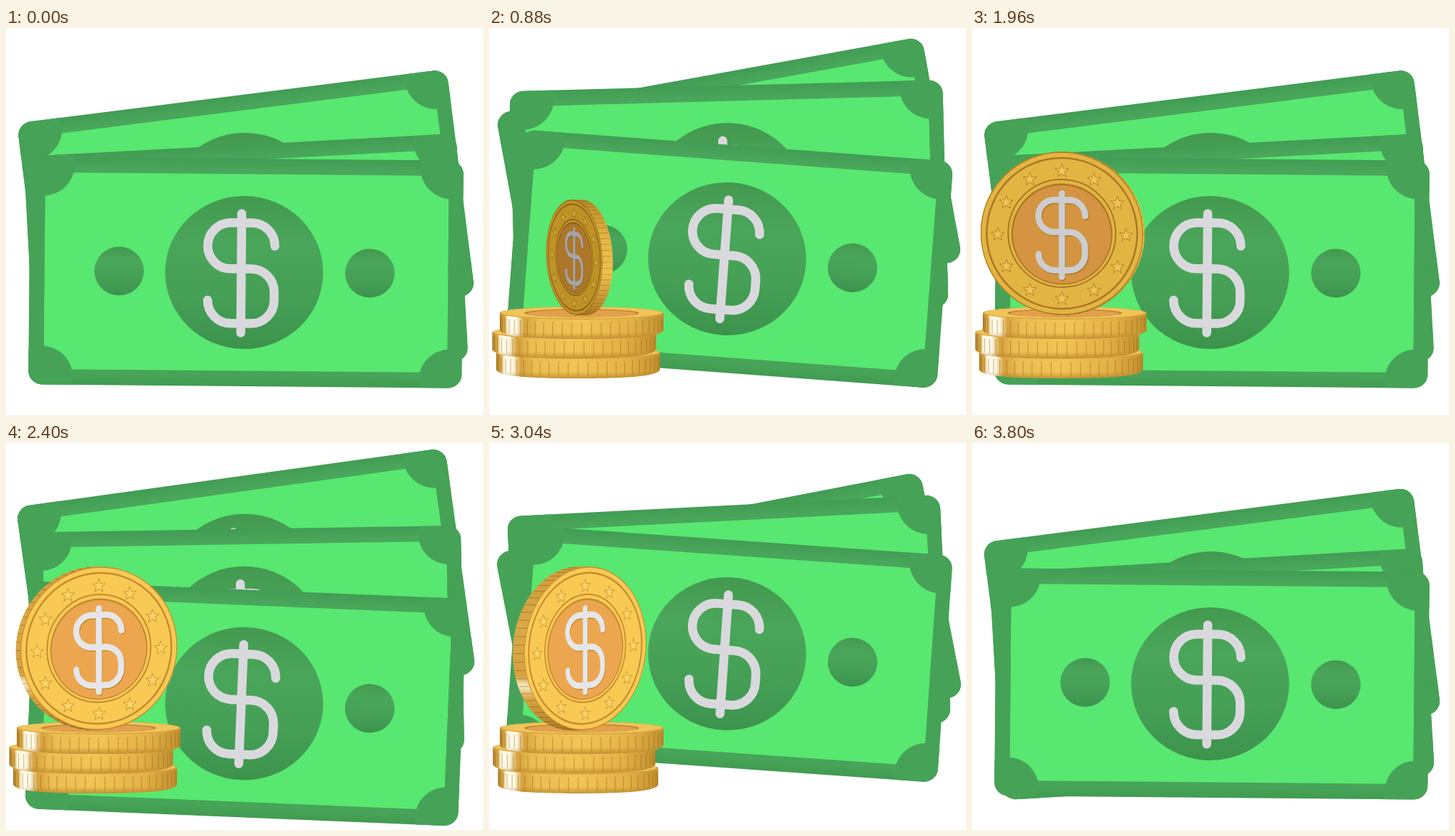
These frames come from a looping animation (664 px wide and 539 px high, 3.84 s). An HTML page with a canvas:

```html
<!DOCTYPE html>
<html lang="en">
<head>
<meta charset="utf-8">
<title>Cash and coins</title>
<style>
html, body { margin: 0; width: 100%; height: 100%; overflow: hidden; background: #fff; }
canvas { display: block; }
</style>
</head>
<body>
<canvas id="stage" width="664" height="539"></canvas>
<script>
const ctx = document.getElementById('stage').getContext('2d');
const LOOP = 3840, SWAY = 1920, STEP = 40, TAU = Math.PI * 2;

const clamp = x => Math.max(0, Math.min(1, x));
const mix = (a, b, k) => a + (b - a) * k;
const blend = (a, b, k) => `rgb(${a.map((v, i) => Math.round(mix(v, b[i], k)))})`;
const easeOut = x => 1 - (1 - clamp(x)) ** 3;
const easeIn = x => clamp(x) ** 2;

// Each wave is [mean, cosine part, sine part]; back to front.
const bills = [
  { y: [243, 9, -39.3], tilt: [-8.95, 1.75, 0.9] },
  { y: [279.5, 41.5, -6], tilt: [-2.55, -0.5, 1.7] },
  { y: [324, 16, 37], tilt: [2.4, -1.9, 0.15] }
];
const wave = ([mean, a, b], phase) => mean + a * Math.cos(phase) + b * Math.sin(phase);

// Bottom to top.
const stack = [
  { x: 124, base: 488 },
  { x: 118.5, base: 460 },
  { x: 129, base: 433 }
];

const spin = [[720, 70], [1320, 35], [1960, 4], [2400, -16], [3040, -41.5], [3440, -60]];

function track(points, t) {
  let i = 1;
  while (i < points.length - 1 && t > points[i][0]) i++;
  const [t0, a] = points[i - 1], [t1, b] = points[i];
  return mix(a, b, clamp((t - t0) / (t1 - t0)));
}

function gradient(x0, y0, x1, y1, ...stops) {
  const g = ctx.createLinearGradient(x0, y0, x1, y1);
  stops.forEach(([at, color]) => g.addColorStop(at, color));
  return g;
}

function oval(x, y, rx, ry, fill) {
  ctx.beginPath();
  ctx.ellipse(x, y, Math.max(0, rx), Math.max(0, ry), 0, 0, TAU);
  ctx.fillStyle = fill;
  ctx.fill();
}

function ring(r, width, color) {
  ctx.beginPath();
  ctx.arc(0, 0, r, 0, TAU);
  ctx.lineWidth = width;
  ctx.strokeStyle = color;
  ctx.stroke();
}

function dollar(x, y, size, color) {
  ctx.save();
  ctx.translate(x, y);
  ctx.scale(size, size);
  ctx.lineWidth = 12.5;
  ctx.lineCap = 'round';
  ctx.strokeStyle = color;
  ctx.beginPath();
  ctx.moveTo(0, -83);
  ctx.lineTo(0, 83);
  ctx.moveTo(46.5, -38);
  ctx.arcTo(46.5, -70, 14, -70, 32);
  ctx.lineTo(-15, -70);
  ctx.arc(-15, -38, 32, -Math.PI / 2, Math.PI / 2, true);
  ctx.lineTo(14, -6);
  ctx.arcTo(46, -6, 46, 26, 32);
  ctx.arcTo(46, 70, 14, 70, 32);
  ctx.lineTo(-15, 70);
  ctx.arcTo(-46.5, 70, -46.5, 38, 32);
  ctx.stroke();
  ctx.restore();
}

function medallion(x, y, rx, ry) {
  oval(x, y, rx, ry, gradient(x, y - ry, x, y + ry,
    [0, '#43994f'], [0.3, '#4aa65a'], [0.65, '#45a056'], [1, '#3d934c']));
}

function drawBill({ y, tilt }, phase, shade) {
  ctx.save();
  ctx.translate(331.5, wave(y, phase));
  ctx.rotate(wave(tilt, phase) * Math.PI / 180);
  ctx.beginPath();
  ctx.roundRect(-299, -158, 603, 317, 19);
  ctx.fillStyle = gradient(0, -158, 0, 159,
    [0, '#429c54'], [0.06, '#4aa75b'], [0.5, '#44a055'], [0.95, '#47a458'], [1, '#419b52']);
  ctx.fill();
  ctx.clip();

  ctx.fillStyle = '#58e771';
  ctx.fillRect(-278, -136.5, 562, 274);
  for (const cx of [-281, 288])
    for (const cy of [-148, 149])
      oval(cx, cy, 44, 44, '#46a257');
  ctx.fillStyle = '#46a257';
  ctx.fillRect(-299, -150, 21, 300);
  ctx.fillRect(284, -150, 20, 300);

  medallion(-174, 0, 34.5, 34);
  medallion(175, 0, 34.5, 34);
  medallion(0, 0.5, 110, 106.5);
  dollar(-4, 1.5, 1, '#d9d9dd');

  if (shade) {
    ctx.setTransform(1, 0, 0, 1, 0, 0);
    oval(55, 235 + shade.drop, 115, 127, `rgba(0,30,20,${0.14 * shade.alpha})`);
  }
  ctx.restore();
}

function drawFlatCoin(x, base, scale, lift) {
  if (scale < 0.03) return;
  const rx = 114 * scale;
  const ry = mix(9, 12.5, lift) * scale;
  const h = mix(27, 18, lift) * scale;
  const top = base - h - ry;
  const shoulder = top + h - 4 * scale;

  ctx.save();
  ctx.beginPath();
  ctx.moveTo(x - rx, top);
  ctx.lineTo(x - rx, shoulder);
  ctx.bezierCurveTo(x - rx, base - 2 * scale, x - rx * 0.5, base, x, base);
  ctx.bezierCurveTo(x + rx * 0.5, base, x + rx, base - 2 * scale, x + rx, shoulder);
  ctx.lineTo(x + rx, top);
  ctx.ellipse(x, top, rx, ry, 0, 0, Math.PI, true);
  ctx.closePath();
  const gleam = blend([255, 250, 232], [226, 178, 72], lift);
  ctx.fillStyle = gradient(x - rx, 0, x + rx, 0,
    [0, '#b08330'], [0.03, '#d9a742'], [0.05, gleam], [0.1, gleam],
    [0.15, '#d6a13c'], [0.24, '#ebbd52'], [0.5, '#f2c455'], [0.8, '#e3b146'], [1, '#c1902f']);
  ctx.fill();
  ctx.clip();

  ctx.lineWidth = 1.2;
  ctx.strokeStyle = 'rgba(140,92,20,.4)';
  for (let i = 1; i < 26; i++) {
    const a = i / 26 * Math.PI;
    const ribX = x + rx * Math.cos(a), ribY = top + ry * Math.sin(a);
    ctx.beginPath();
    ctx.moveTo(ribX, ribY + 4 * scale);
    ctx.lineTo(ribX, ribY + h - 3 * scale);
    ctx.stroke();
  }
  ctx.fillStyle = gradient(0, base - 9, 0, base, [0, 'rgba(150,100,20,0)'], [1, 'rgba(150,100,20,.5)']);
  ctx.fillRect(x - rx, base - 9, rx * 2, 9);
  ctx.restore();

  oval(x, top, rx, ry, '#d7a440');
  oval(x, top - 0.5, rx - 2, ry - 1, '#f0c458');
  oval(x, top, rx * 0.7, ry * 0.64, '#b67d33');
  oval(x, top + 0.5, rx * 0.67, ry * 0.56, '#e3a04c');
}

function star(x, y, r, fill, edge) {
  ctx.beginPath();
  for (let i = 0; i < 10; i++) {
    const a = -Math.PI / 2 + i * Math.PI / 5, d = i % 2 ? r * 0.43 : r;
    ctx.lineTo(x + d * Math.cos(a), y + d * Math.sin(a));
  }
  ctx.closePath();
  ctx.lineWidth = 1.6;
  ctx.strokeStyle = edge;
  ctx.stroke();
  ctx.fillStyle = fill;
  ctx.fill();
}

function drawStandingCoin(degrees, scale) {
  if (scale < 0.01) return;
  const theta = degrees * Math.PI / 180;
  const sin = Math.sin(theta), cos = Math.cos(theta);
  const light = clamp((35 - degrees) / 50);
  const gold = blend([190, 146, 38], [248, 202, 84], light);
  const groove = blend([132, 90, 22], [197, 138, 46], light);
  const copper = blend([172, 119, 42], [236, 166, 80], light);
  const R = 113.5;

  ctx.save();
  ctx.translate(126, 399);
  ctx.scale(scale, scale);
  ctx.translate(0, -113);

  const rim = degrees > 0
    ? gradient(0, -R, 0, R, [0, '#b98d2c'], [0.3, '#e6b743'], [0.6, '#efc04d'], [1, '#a97a22'])
    : gradient(0, -R, 0, R, [0, '#d09d3d'], [0.35, '#dca948'], [0.64, '#d6a242'],
        [0.7, '#f8ecc8'], [0.78, '#d9a643'], [1, '#a97a2c']);
  const layer = depth => {
    ctx.save();
    ctx.transform(cos, 0.1 * sin, 0, 1, depth * 12 * sin, 0);
  };
  for (let depth = 1; depth > -1; depth -= 0.1) {
    layer(depth);
    oval(0, 0, R, R, rim);
    ctx.restore();
  }
  ctx.strokeStyle = 'rgba(130,86,20,.45)';
  ctx.lineWidth = 1.2;
  const side = Math.sign(sin);
  for (let i = -14; i <= 14; i++) {
    const a = i * Math.PI / 30;
    const x = side * R * Math.cos(a);
    const px = x * cos, py = R * Math.sin(a) + x * 0.1 * sin;
    ctx.beginPath();
    ctx.moveTo(px + 10 * sin, py);
    ctx.lineTo(px - 12 * sin, py);
    ctx.stroke();
  }

  layer(-1);
  oval(0, 0, R, R, groove);
  oval(0, 0, R - 1.2, R - 1.2, gold);
  ring(105, 2.5, groove);
  ring(75, 2, groove);
  oval(0, 1, 70.5, 70.5, groove);
  oval(0, 1.5, 68.5, 68.5, copper);
  for (let i = 0; i < 12; i++) {
    const a = i * TAU / 12;
    star(89.5 * Math.sin(a), 2 - 89 * Math.cos(a), 8.5,
      blend([214, 168, 58], [252, 212, 100], light), groove);
  }
  dollar(1, 4, 0.7, groove);
  dollar(0, 2.5, 0.7, blend([165, 165, 168], [230, 230, 233], light));
  ctx.restore();
  ctx.restore();
}

function draw(t) {
  ctx.clearRect(0, 0, 664, 539);

  // The sway rests for one step at the start of each cycle.
  const phase = Math.max(0, t % SWAY - STEP) / (SWAY - STEP) * TAU;
  const lift = 1 - easeIn((t - 400) / 400);
  const drop = -282 * lift;
  const shown = t > 200 && t < 760;
  const shade = shown && { drop: drop + 271, alpha: clamp((t - 200) / 240) * clamp(lift * 1.2) };

  bills.forEach((bill, i) => drawBill(bill, phase, i === 2 && shade));

  stack.forEach(({ x, base }, i) => {
    const enter = easeOut((t - 180 - i * 50) / 380);
    const leave = 1 - easeIn((t - 2990 - i * 20) / 340);
    drawFlatCoin(x + 2.5 * lift, base + drop + 3 * i * lift, enter * leave, lift);
  });

  const grow = easeOut((t - 760) / 360) * (1 - easeIn((t - 3060) / 320));
  drawStandingCoin(track(spin, t), grow);
}

function tick() {
  const t = performance.now() % LOOP;
  draw(Math.floor(t / STEP) * STEP);
  requestAnimationFrame(tick);
}
tick();
</script>
</body>
</html>
```
